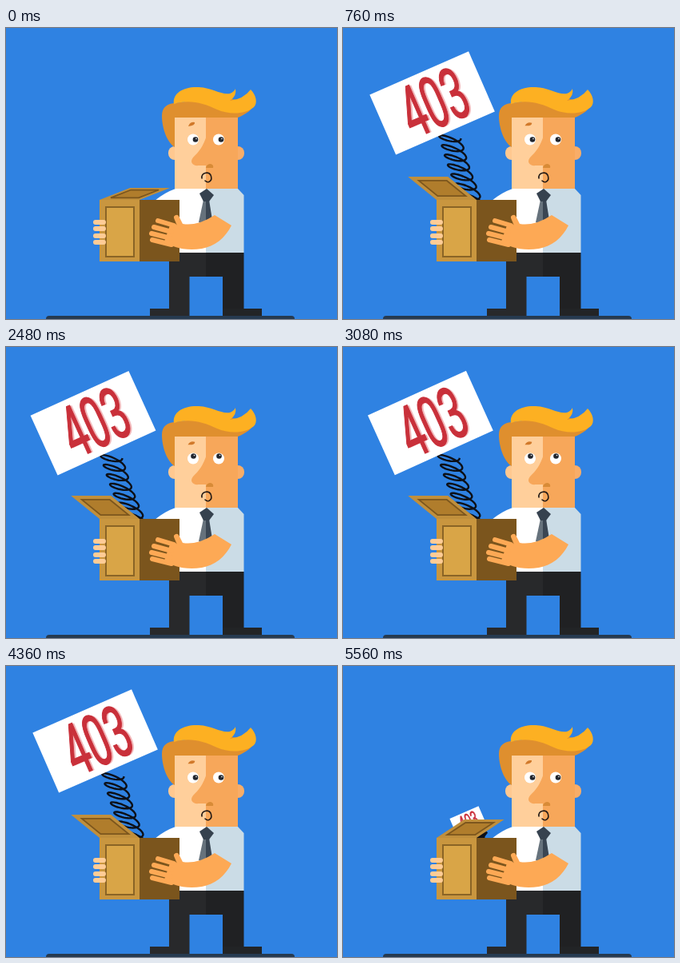
These frames come from a looping animation (414x364 px, 5600 ms). An HTML page:

```html
<!DOCTYPE html>
<html lang="en">
<head>
<meta charset="utf-8">
<title>403</title>
<style>
html, body { margin: 0; width: 100%; height: 100%; overflow: hidden; background: #2f82e2; }
svg { display: block; width: 414px; height: 364px; }
.code { font: 400 90px Roboto, "Liberation Sans", sans-serif; text-anchor: middle; }
.finger { fill: none; stroke-linecap: round; stroke-width: 6; }
</style>
</head>
<body>
<svg viewBox="0 0 414 364">
  <rect width="414" height="364" fill="#2f82e2"/>
  <path d="M50 364Q50 360 54 360H357Q361 360 361 364Z" fill="#263a50"/>

  <!-- legs -->
  <path d="M204 281H251V311H229.500V360H180V351H204Z" fill="#28292b"/>
  <path d="M250 281H297.500V353H271V311H250Z" fill="#202123"/>
  <path id="foot" d="M271 351H320V360H271Z" fill="#222426"/>

  <!-- shirt and tie -->
  <path d="M212 201H251V281H217V240L186 216Q198 206 212 201Z" fill="#fff"/>
  <path d="M250 201H290L297.500 209V281H250Z" fill="#cbdce6"/>
  <path d="M247 215L241 243L250 247V215Z" fill="#66727c"/>
  <path d="M250 215H254L258 240L250 247Z" fill="#3a4653"/>
  <path d="M251 201L242 207L247 217H254L260 209Z" fill="#36424f"/>

  <!-- head -->
  <rect x="203" y="148" width="18" height="17" rx="8" fill="#ffc890"/>
  <rect x="280" y="148" width="18" height="17" rx="8" fill="#f8ad68"/>
  <path d="M211 104H251V201H211Z" fill="#ffcf9b"/>
  <path d="M250 104H290V201H250Z" fill="#f7a75a"/>
  <path d="M251 134C247 148 241 155 234 162C229 168 234 173 241 172H251Z" fill="#f7a75a"/>
  <path d="M250 175Q251 170 256 170Q260 171 259 175Z" fill="#d88b37"/>
  <path d="M211 149C201 143 195 124 195 110C195 99 202 94 212 94L262 86L311 93C309 102 300 108 290 112H211Z" fill="#df8f2e"/>
  <path d="M210 95C208 81 223 73 241 74C259 75 269 84 280 82Q285 80 287 76Q289 85 280 91Q297 89 306 77C313 84 315 94 310 99C298 109 278 108 264 102C246 93 228 89 210 95Z" fill="#fdb022"/>
  <path id="brow" d="M228 123Q230 117 236 118Q237 122 228 123Z" fill="#d1792a"/>
  <g fill="#fff"><circle cx="234" cy="139.500" r="7"/><circle cx="266" cy="139.500" r="7"/></g>
  <g id="pupils">
    <circle cx="234.500" cy="139.500" r="3.300" fill="#22262e"/><circle cx="266.500" cy="139.500" r="3.300" fill="#22262e"/>
    <circle cx="235.500" cy="138.500" r=".8" fill="#fff"/><circle cx="267.500" cy="138.500" r=".8" fill="#fff"/>
  </g>
  <path d="M245 188C244 181 253 179 256 184C259 191 253 195 249 191" fill="none" stroke="#251b16" stroke-width="1.600" stroke-linecap="round"/>

  <!-- sign on its spring -->
  <path id="spring" fill="none" stroke="#0c1018" stroke-width="2.400" stroke-linejoin="round"/>
  <g id="sign">
    <rect x="-67.500" y="-82" width="135" height="82" fill="#fff"/>
    <g transform="translate(2.500 -9.300) scale(.55 1)">
      <text class="code" x="4" y="1" fill="#f2b9bb">403</text>
      <text class="code" fill="#c9303a" stroke="#c9303a" stroke-width="1.500">403</text>
    </g>
  </g>

  <!-- box -->
  <path id="lid" fill="#c08f3c"/>
  <path id="trim" fill="#b07d2c" stroke="#7c561d" stroke-width="1.800"/>
  <rect x="117" y="215" width="50" height="77" fill="#c9963f"/>
  <rect x="125" y="224" width="35" height="62" fill="#d9a547" stroke="#8a6426" stroke-width="2"/>
  <rect x="167" y="215" width="50" height="77" fill="#7b551d"/>

  <!-- hands -->
  <path class="finger" d="M112 243H122M112 251H122M112 260H122M112 268H122" stroke="#ffcc96"/>
  <path d="M211 236Q214 231 217 237L221 245Q240 248 261 234L282 247C274 263 261 273 245 276C223 279 207 274 198 267L205 247L215 246Z" fill="#fda955"/>
  <path class="finger" d="M190 241L210 247M185 249L207 255M182 257L206 263M183 265L207 271M213 237L218 249" stroke="#fda955"/>
</svg>
<script>
const LOOP = 5600;
const $ = id => document.getElementById(id);
const clamp = p => Math.max(0, Math.min(1, p));
const span = (t, a, b) => clamp((t - a) / (b - a));
const smooth = p => p * p * (3 - 2 * p);
const mix = (a, b, p) => a + (b - a) * p;
const backIn = (p, s) => p * p * ((s + 1) * p - s);
const backOut = (p, s) => 1 - backIn(1 - p, s);
const swell = (p, times) => Math.sin(Math.PI * times * p) ** 2;
const set = (id, name, value) => $(id).setAttribute(name, value);

function signOut(t) {
  return t < 4840 ? backOut(span(t, 230, 760), 1.2)
                  : 1 - backIn(span(t, 4840, 5600), 1.45);
}

function lidOpen(t) {
  return smooth(span(t, 20, 310)) * (1 - smooth(span(t, 5340, 5615)));
}

function drawSpring(x, y) {
  const bx = 162, by = 218, loops = 7, n = 220;
  const rise = Math.min(5, Math.abs(by - y) / 13);
  let d = "";
  for (let i = 0; i <= n; i++) {
    const p = i / n, a = p * loops * 2 * Math.PI;
    const c = Math.cos(a), s = rise * Math.sin(a);
    const px = mix(x + 5, bx, p) - 2 * Math.sin(Math.PI * p) + 14.5 * c;
    const py = mix(y + 2, by, p) + s + rise * 0.9 * c;
    d += (i ? "L" : "M") + px.toFixed(1) + " " + py.toFixed(1);
  }
  set("spring", "d", d);
}

function drawLid(open) {
  const a = mix(-21.5, -141, open) * Math.PI / 180, len = mix(41, 46, open);
  const vx = len * Math.cos(a), vy = len * Math.sin(a);
  const at = (u, v) => `${117 + 50 * u + vx * v} ${215 + vy * v}`;
  const quad = (u, v) => `M${at(u, v)}L${at(1 - u, v)}L${at(1 - u, 1 - v)}L${at(u, 1 - v)}Z`;
  set("lid", "d", quad(0, 0));
  set("trim", "d", quad(0.15, 0.17));
}

function draw(t) {
  const out = signOut(t), open = lidOpen(t);
  const sway = swell(span(t, 2120, 3520), 2);
  const x = mix(170, 128, out) - 2 * sway;
  const y = mix(225, 131.5, out) + sway;
  const scale = mix(0.1, 1, Math.min(1, out));
  set("sign", "transform", `translate(${x} ${y}) rotate(${-23.6 - 0.9 * sway}) scale(${scale})`);
  drawSpring(x, y);
  drawLid(open);

  // Glance aside by default, up at the sign, then straight ahead
  const up = smooth(span(t, 2120, 2280)) * (1 - smooth(span(t, 3360, 3520)));
  const ahead = smooth(span(t, 4840, 4960)) * (1 - smooth(span(t, 5240, 5400)));
  const px = 2.5 * (1 - Math.max(up, ahead)), py = -3 * up;
  set("pupils", "transform", `translate(${px} ${py})`);
  set("brow", "transform", `rotate(${10 * open} 232 120)`);

  // Toe lifts, hinged at the heel
  const lift = swell(span(t, 1240, 1880), 1) + swell(span(t, 3720, 4360), 1);
  set("foot", "transform", `rotate(${-6.2 * lift} 272 359)`);
}

const start = performance.now();
function tick() {
  draw((performance.now() - start) % LOOP);
  requestAnimationFrame(tick);
}
tick();
</script>
</body>
</html>
```
